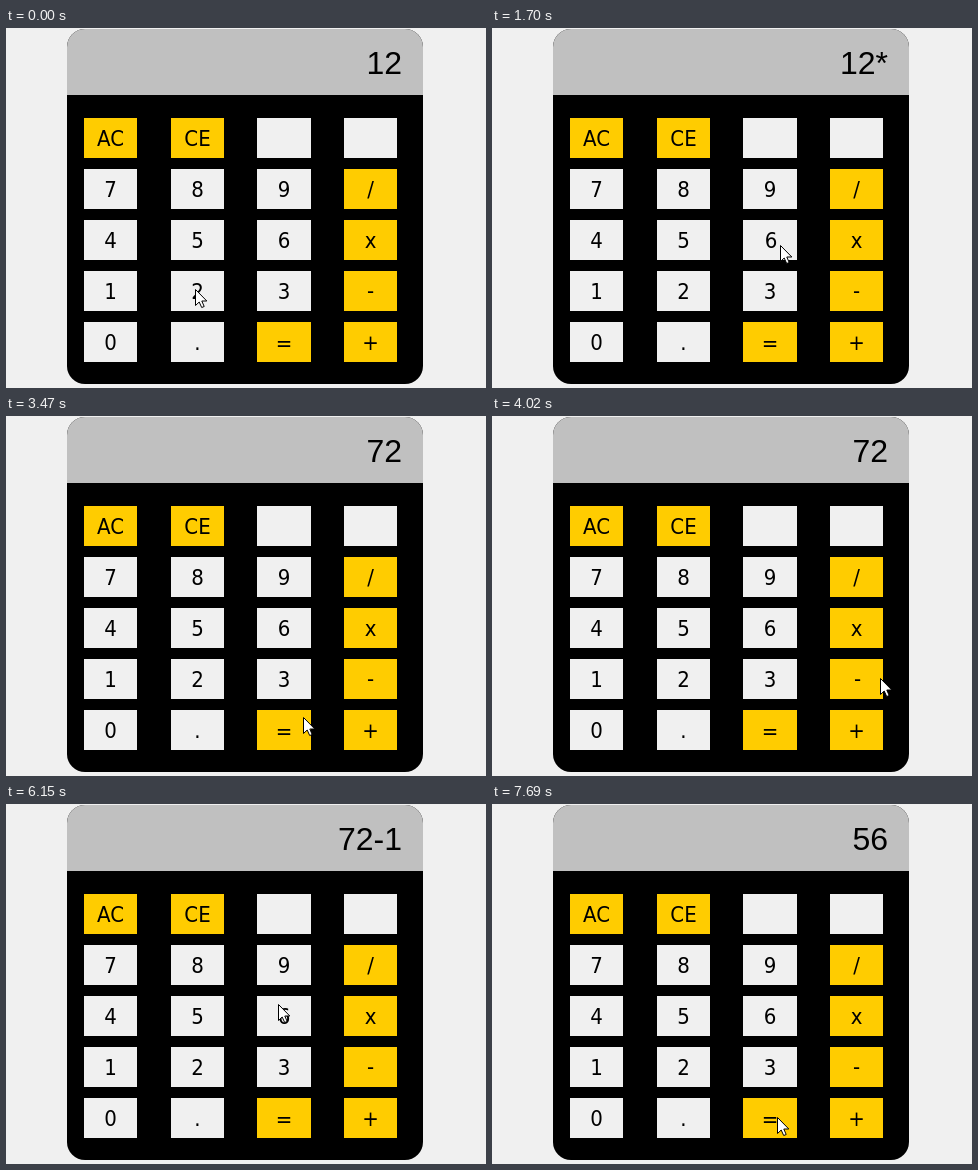
These frames come from a looping animation (480x360 px, 8 s). An HTML page:

```html
<!DOCTYPE html>
<html lang="en">
<head>
<meta charset="utf-8">
<title>Calculator</title>
<style>
  html, body { margin: 0; width: 100%; height: 100%; overflow: hidden; background: #f0f0f0; }
  svg { display: block; }
  .key { font: 22px "DejaVu Sans Condensed", "DejaVu Sans", sans-serif; font-stretch: condensed; text-anchor: middle; }
  .display { font: 32px "Liberation Sans", Arial, sans-serif; text-anchor: end; }
</style>
</head>
<body>
<svg id="stage" width="480" height="360" viewBox="0 0 480 360">
  <rect x="61" y="1" width="356" height="355" rx="18"/>
  <path d="M61 67V19a18 18 0 0 1 18-18H399a18 18 0 0 1 18 18V67Z" fill="#c0c0c0"/>
  <text id="display" class="display" x="396" y="46"></text>
  <g id="keys"></g>
  <path id="cursor" d="M.5 .5V16.5L4.2 13L6.7 18.5L9.2 17.5L6.8 12H11.8Z" fill="#fff" stroke="#000"/>
</svg>
<script>
const LOOP = 8000;
const COLUMNS = [78, 165, 251, 338];
const ROWS = [
  ['AC', 'CE', '', ''],
  ['7', '8', '9', '/'],
  ['4', '5', '6', 'x'],
  ['1', '2', '3', '-'],
  ['0', '.', '=', '+']
];
const YELLOW = ['AC', 'CE', '/', 'x', '-', '=', '+'];
const NUDGE = { '-': -1, '=': 1 };

// start, end, step count, destination x and y, vertical bow
const HOME = [189, 261];
const MOVES = [
  [60, 510, 9, 371, 212, 0],
  [1190, 1430, 5, 288, 217, 0],
  [2160, 2530, 7, 288, 305, 0],
  [3470, 3820, 6, 388, 262, 0],
  [4510, 4930, 8, 112, 262, 4],
  [5720, 6150, 8, 272, 200, -33],
  [6910, 7270, 7, 285, 313, 0]
];

// press, release, key, display after release
const CLICKS = [
  [690, 900, 'x', '12*'],
  [1700, 1910, '6', '12*6'],
  [2770, 2980, '=', '72'],
  [4020, 4230, '-', '72-'],
  [5360, 5570, '1', '72-1'],
  [6450, 6670, '6', '72-16'],
  [7480, 7690, '=', '56']
];

const byId = id => document.getElementById(id);
const display = byId('display');
const cursor = byId('cursor');
const labels = {};

function add(tag, attrs) {
  const el = document.createElementNS('http://www.w3.org/2000/svg', tag);
  for (const name in attrs) el.setAttribute(name, attrs[name]);
  return byId('keys').appendChild(el);
}

ROWS.forEach((row, r) => row.forEach((label, c) => {
  const x = COLUMNS[c], y = 90 + 51 * r;
  const width = c === 2 ? 54 : 53;
  add('rect', { x, y, width, height: 40, fill: YELLOW.includes(label) ? '#ffcc00' : '#f0f0f0' });
  if (!label) return;
  const text = add('text', { class: 'key', x: x + width / 2, y: y + 28 + (NUDGE[label] || 0) });
  text.textContent = label;
  labels[label] = text;
}));

// Quick start, long settling tail
function ease(u) {
  const v = u ** 0.8;
  return v * v * v * (10 - 15 * v + 6 * v * v);
}

function stepsDone(t, start, end, count) {
  const gap = (end - start) / (count - 1);
  let done = 0;
  while (done < count && t >= start + Math.floor(done * gap / 10) * 10) done++;
  return done;
}

function cursorAt(t) {
  let [x, y] = HOME;
  for (const [start, end, count, toX, toY, bow] of MOVES) {
    if (t < start) break;
    const p = ease(stepsDone(t, start, end, count) / count);
    x += (toX - x) * p;
    y += (toY - y) * p + bow * Math.sin(Math.PI * p);
  }
  return [Math.round(x), Math.round(y)];
}

function render(t) {
  let value = '12', pressed = '';
  for (const [down, up, key, result] of CLICKS) {
    if (t >= up) value = result;
    else if (t >= down) pressed = key;
  }
  display.textContent = value;
  for (const key in labels) {
    labels[key].setAttribute('transform', `translate(${key === pressed ? 1 : 0} 0)`);
  }
  cursor.setAttribute('transform', `translate(${cursorAt(t)})`);
}

const began = performance.now();
function tick() {
  render((performance.now() - began) % LOOP);
  requestAnimationFrame(tick);
}
tick();
</script>
</body>
</html>
```
